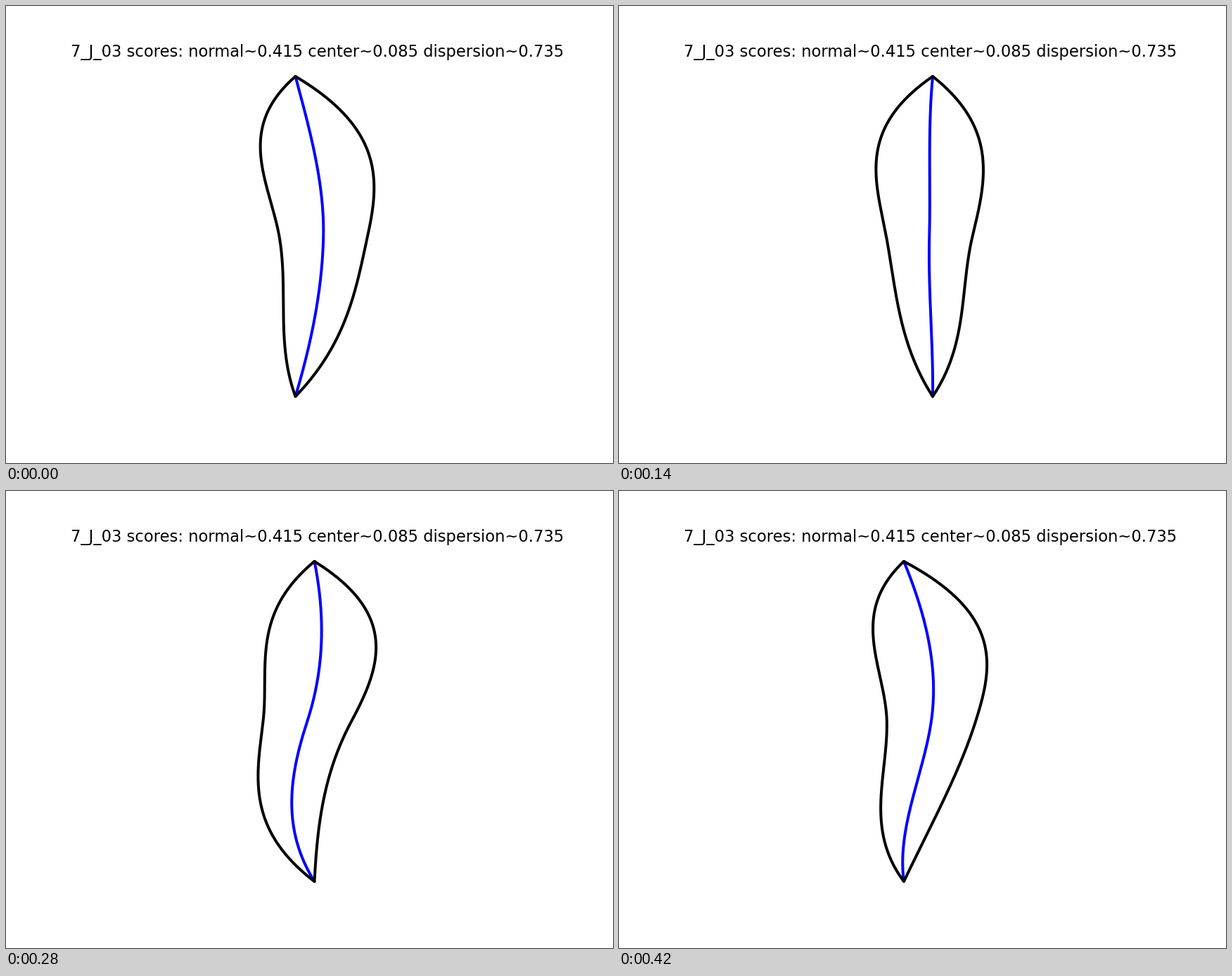
Write a matplotlib script that moves like this. It is 863x649 px and loops after 490 ms.

```python
import numpy as np
import matplotlib.pyplot as plt
from matplotlib.animation import FuncAnimation

W, H, DPI = 863, 649, 72          # at 72 dpi one point is one pixel
TOP, BOTTOM = 100.0, 554.5
STEP_MS = 70

# One row per pose: x of both tips, then for the left and the right edge
# the x at 1/4, 1/2 and 3/4 of the height and the slope at 1/2.
POSES = [
    (411.5, (362.3, 388.5, 394.5, 40), (516.9, 514.0, 484.0, -49.5)),
    (422.0, (363.2, 388.5, 405.0, 48), (516.2, 513.5, 493.5, -40)),
    (446.0, (366.4, 380.0, 400.0, 42), (516.9, 502.5, 486.5, -54)),
    (451.0, (369.0, 367.5, 383.5, 10), (520.3, 490.0, 469.0, -92)),
    (438.5, (371.0, 365.5, 361.5, -27), (525.8, 491.0, 451.0, -122)),
    (418.5, (369.2, 370.0, 358.2, -34), (525.5, 495.0, 446.0, -116)),
    (405.0, (362.0, 380.8, 372.3, 5), (518.7, 507.0, 460.5, -72)),
]

U = np.linspace(0, 1, 101)
Y = np.linspace(TOP, BOTTOM, 2 * len(U) - 1)


def cubic_from_middle(mid, slope, quarter, tip):
    """Cubic over 0..1 leaving mid with a slope, via quarter at 0.5, to tip."""
    total = tip - mid - slope
    half = quarter - mid - slope / 2
    b = 8 * half - total
    c = total - b
    return mid + slope * U + b * U**2 + c * U**3


def edge(tip, shape):
    upper_q, mid, lower_q, slope = shape
    upper = cubic_from_middle(mid, -slope, upper_q, tip)[::-1]
    lower = cubic_from_middle(mid, slope, lower_q, tip)
    return np.concatenate([upper, lower[1:]])


fig = plt.figure(figsize=((W + 1e-6) / DPI, (H + 1e-6) / DPI), dpi=DPI,
                 facecolor="white")
ax = fig.add_axes([0, 0, 1, 1])
ax.set_xlim(0, W)
ax.set_ylim(H, 0)
ax.axis("off")

ax.text(442.5, 71.5, "7_J_03 scores: normal~0.415 center~0.085 dispersion~0.735",
        family="DejaVu Sans", size=22.6, ha="center", va="baseline")

style = dict(lw=4, solid_joinstyle="round", solid_capstyle="round")
midline, = ax.plot([], [], color="blue", zorder=2, **style)
outline, = ax.plot([], [], color="black", zorder=3, **style)


def draw(i):
    tip, left_shape, right_shape = POSES[i % len(POSES)]
    left, right = edge(tip, left_shape), edge(tip, right_shape)
    midline.set_data((left + right) / 2, Y)
    outline.set_data(np.concatenate([left, right[::-1]]),
                     np.concatenate([Y, Y[::-1]]))
    return midline, outline


anim = FuncAnimation(fig, draw, frames=len(POSES), interval=STEP_MS,
                     repeat=True, repeat_delay=0)
plt.show()
```
